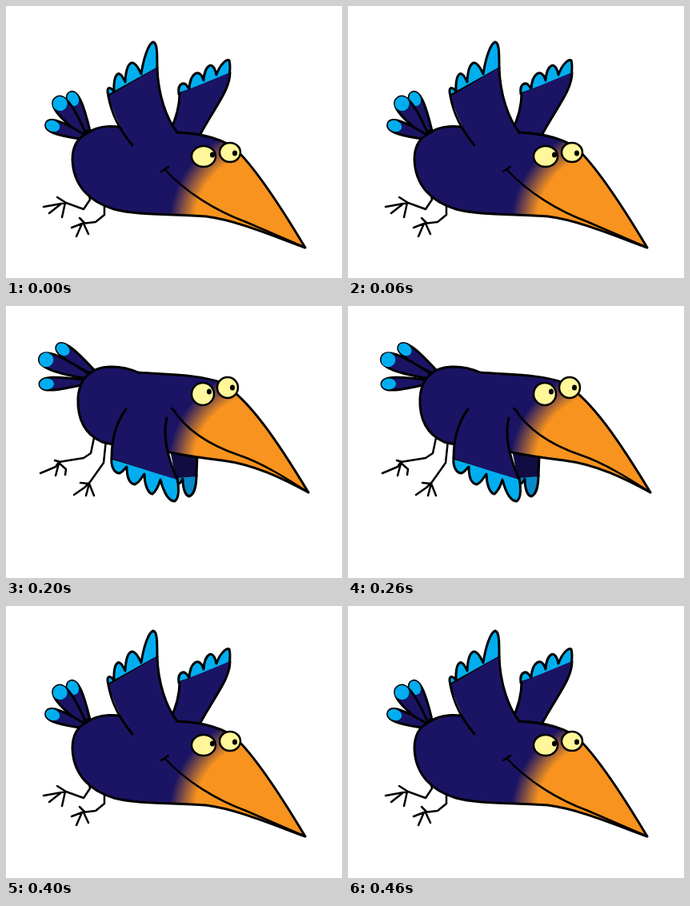
These frames come from a looping animation (420x340 px, 500 ms). An HTML page with a canvas:

```html
<!DOCTYPE html>
<html lang="en">
<head>
<meta charset="utf-8">
<title>Flapping bird</title>
<style>
html, body { margin: 0; width: 100%; height: 100%; overflow: hidden; background: #fff; }
canvas { display: block; }
</style>
</head>
<body>
<canvas id="stage" width="420" height="340"></canvas>
<script>
const ctx = document.getElementById('stage').getContext('2d');
const NAVY = '#1b1464', DARK = '#110c42', SKY = '#00aeef', DEEP = '#0888c8', ORANGE = '#f7931e', CREAM = '#fff79a';

// tail: base x, y, tip x, y, half width; eyes: x, y, rx, ry, pupil x, y
// wings: [fill, path, outline width]
const up = {
  glow: [330, 275],
  tail: [[102, 156, 80, 108, 8], [97, 160, 62, 115, 10], [98, 164, 50, 147, 8]],
  legs: 'M103 232L105 242L97 254L75 246L47 251M75 246L64 239M68 248L54 259M74 246L70 264M123 247L123 261L112 270L95 272L82 277M95 272L88 288M97 272L103 285M98 271L92 265',
  far: [
    [SKY, 'M216 110C214 96 224 92 229 104C230 84 242 76 247 93C248 74 259 66 263 86C268 72 276 66 279 68C281 75 280 80 279 88Z', 3],
    [NAVY, 'M217 109L280 83C280 105 262 125 243 160L205 156C213 140 217 125 217 109'],
    [null, 'M280 83C280 105 262 125 243 160M205 156C213 140 217 125 217 109', 3]
  ],
  body: 'M100 160C115 148 140 148 160 156L205 158C235 158 262 162 285 177C310 200 340 245 374 302C340 290 290 268 250 263C200 260 160 261 135 254C105 245 84 225 83 192C83 175 90 165 100 160Z',
  near: [
    [SKY, 'M128 112C124 100 132 100 135 108C134 85 141 76 149 95C150 72 158 60 169 85C172 65 178 47 184 45C189 46 189 58 189 78Z', 3],
    [NAVY, 'M128 113L189 77C190 110 200 140 214 158L185 180L158 174C145 158 135 135 128 113'],
    [null, 'M128 113C132 135 142 155 158 174M189 77C190 110 200 140 214 158', 3]
  ],
  mouth: 'M194 207L203 201M198 204C225 233 262 256 300 270L374 302',
  eyes: [[247, 188, 15, 13, 258, 186], [280, 183, 13, 12, 286, 184]]
};

const level = {
  glow: [325, 245],
  tail: [[101, 124, 69, 78, 8], [97, 127, 51, 90, 9], [97, 132, 38, 129, 7]],
  legs: 'M97 190L101 214L92 229L80 231L62 227L41 234M62 227L56 241M62 227L69 239M62 227L58 219M118 211L116 234L107 246L94 252L76 261M94 252L85 269M94 252L103 262M98 250L90 247',
  far: [],
  body: 'M100 125C120 115 155 113 185 117C215 120 240 125 257 133C295 158 325 205 365 276C335 263 290 236 240 230C205 226 165 228 130 221C108 208 84 182 84 156C83 140 88 131 100 125Z',
  near: [
    [SKY, 'M115 147C102 145 95 149 96 154C99 159 107 160 112 160C102 163 95 167 98 172C104 177 113 176 119 177C110 182 107 190 110 196C118 203 127 200 133 200C128 208 126 215 129 221C138 224 148 222 153 215C137 200 120 175 115 147Z', 2],
    [null, 'M110 147C130 146 147 141 155 131M201 156C190 180 175 203 150 221', 2.5]
  ],
  mouth: 'M196 177L206 170M202 173C225 205 265 229 310 247L365 276',
  eyes: [[241, 155, 15, 13, 249, 154], [272, 153, 14, 11, 277, 153]]
};

const down = {
  glow: [328, 202],
  tail: [[108, 82, 64, 49, 8], [103, 88, 42, 64, 10], [97, 95, 42, 98, 8]],
  legs: 'M110 165L106 184L97 190L66 195L62 201L43 209M66 197L62 212M66 196L75 204L74 211M68 195L61 193M125 168L122 196L105 220L98 227L85 236M104 222L100 237M104 222L110 237M103 222L93 221',
  far: [
    [DEEP, 'M213 213C214 222 216 226 221 216C221 228 224 237 229 238C235 236 238 225 238 211Z', 3],
    [DARK, 'M205 180L239 187L238 213L212 215Z'],
    [null, 'M239 188L238 213', 3]
  ],
  body: 'M105 84C115 75 140 72 165 83C200 86 240 85 270 96C305 118 340 170 378 233C345 215 310 198 270 193C245 190 220 186 205 183C180 180 140 175 120 170C98 160 89 140 90 115C91 100 96 90 105 84Z',
  near: [
    [SKY, 'M132 190C131 200 135 209 142 209C147 207 148 203 151 201C151 213 154 222 161 223C168 220 170 213 173 210C173 222 177 234 183 235C189 230 191 224 193 217C197 232 203 244 211 244C217 240 216 225 214 215Z', 3],
    [NAVY, 'M150 129C138 145 132 165 132 190Q170 204 214 217C200 185 196 160 201 140Z'],
    [null, 'M150 129C138 145 132 165 132 190M201 140C196 160 200 185 214 217', 3]
  ],
  mouth: 'M207 128L212 132M208 128C225 155 255 174 290 186C320 196 350 215 378 233',
  eyes: [[246, 110, 14, 14, 254, 107], [277, 102, 13, 13, 283, 102]]
};

const steps = [[up, 0], [level, 0], [down, 0], [down, 12], [up, -14]];

function shape(fill, d, width) {
  const path = new Path2D(d);
  if (fill) { ctx.fillStyle = fill; ctx.fill(path); }
  if (width) { ctx.lineWidth = width; ctx.stroke(path); }
}

function oval(fill, x, y, rx, ry, width) {
  ctx.beginPath();
  ctx.ellipse(x, y, rx, ry, 0, 0, 7);
  ctx.fillStyle = fill;
  ctx.fill();
  if (width) { ctx.lineWidth = width; ctx.stroke(); }
}

function feather([x, y, tipX, tipY, w]) {
  const len = Math.hypot(tipX - x, tipY - y);
  ctx.save();
  ctx.translate(x, y);
  ctx.rotate(Math.atan2(tipY - y, tipX - x));
  shape(NAVY, `M0 -3C${len / 2} ${-w} ${len} ${-w * 1.5} ${len} 0C${len} ${w * 1.5} ${len / 2} ${w} 0 3Z`, 3);
  oval(SKY, len - 9, 0, 9, w - 1);
  ctx.restore();
}

function drawBird(pose, dy) {
  ctx.save();
  ctx.translate(0, dy);
  ctx.strokeStyle = '#000';
  ctx.lineCap = ctx.lineJoin = 'round';
  pose.tail.forEach(feather);
  shape(null, pose.legs, 2.5);
  pose.far.forEach(part => shape(...part));

  const [x, y] = pose.glow;
  const skin = ctx.createRadialGradient(x, y, 0, x, y, 126);
  skin.addColorStop(0.75, ORANGE);
  skin.addColorStop(1, NAVY);
  shape(skin, pose.body, 3);

  pose.near.forEach(part => shape(...part));
  shape(null, pose.mouth, 2.5);
  for (const [ex, ey, rx, ry, px, py] of pose.eyes) {
    oval(CREAM, ex, ey, rx, ry, 2.5);
    oval('#000', px, py, 3, 3.5);
  }
  ctx.restore();
}

function tick() {
  const step = Math.floor(performance.now() % 500 / 100);
  ctx.fillStyle = '#fff';
  ctx.fillRect(0, 0, 420, 340);
  drawBird(...steps[step]);
  requestAnimationFrame(tick);
}
tick();
</script>
</body>
</html>
```
